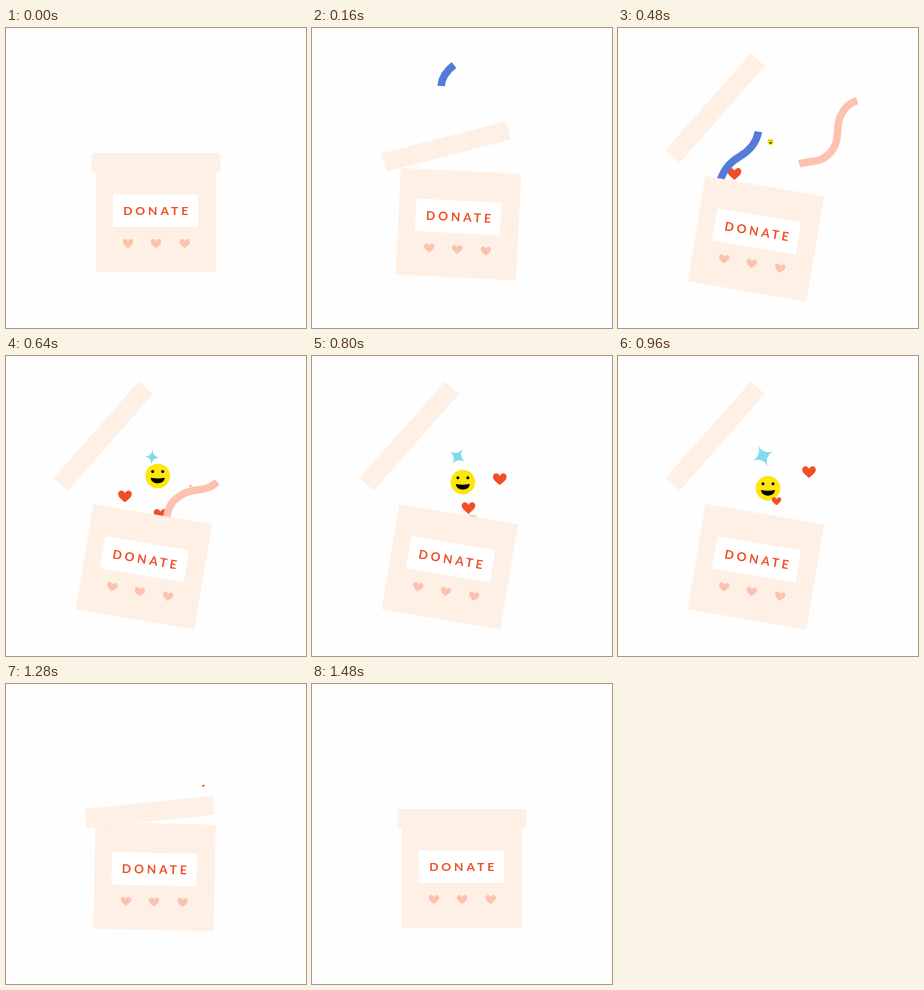
These frames come from a looping animation (300x300 px, 1560 ms). An HTML page:

```html
<!DOCTYPE html>
<html lang="en">
<head>
<meta charset="utf-8">
<title>Donation box</title>
<style>
html, body { margin: 0; width: 100%; height: 100%; overflow: hidden; background: #fefefe; }
svg { display: block; width: 100%; height: 100%; }
.ribbon { fill: none; stroke-width: 7.5; }
.cream { fill: #fef0e4; }
.red { fill: #f04e27; }
.label { font: 700 12.2px Lato, sans-serif; letter-spacing: 2.9px; }
</style>
</head>
<body>
<svg viewBox="0 0 300 300">
  <defs>
    <path id="heart" d="M0 .88C-.4 .5-1 .15-1-.35C-1-.95-.25-1.05 0-.45C.25-1.05 1-.95 1-.35C1 .15 .4 .5 0 .88Z"/>
  </defs>
  <path id="star" fill="#80d9ef" d="M0-1Q.08-.1 1 0Q.1.08 0 1Q-.08.1-1 0Q-.1-.08 0-1Z"/>
  <g id="smiley">
    <circle r="12.3" fill="#fde60c"/>
    <circle cx="-5" cy="-4.5" r="1.5"/>
    <circle cx="5" cy="-4.5" r="1.5"/>
    <path d="M-7 1.8Q0 3.2 7 1.8C6.5 9.2-6.5 9.2-7 1.8Z"/>
  </g>
  <g id="hearts" class="red"></g>
  <path id="blue" class="ribbon" stroke="#557bd9" d="M142 37C133 44 129 51 129 60C129 75 141 82 141 97C141 112 133 122 121 129C112 134 104 142 100 160"/>
  <path id="pink" class="ribbon" stroke="#fdc1b0" d="M247.5 71C238 72 231 75 226 82C214 98 226 112 210 127C198 137 190 131 177 138C166 144 161 151 160 168"/>
  <g id="body">
    <rect class="cream" x="-60.2" y="-53.6" width="120.4" height="106.7"/>
    <rect x="-43" y="-24" width="85" height="32.5" fill="#fff"/>
    <text class="label red" x="-32.8" y="-3.3">DONATE</text>
    <g id="row" fill="#fdc1b0"></g>
  </g>
  <rect id="lid" class="cream" x="-64.4" y="-9.5" width="128.8" height="19"/>
</svg>
<script>
const LOOP = 1560, STEP = 40;
const $ = id => document.getElementById(id);
const clamp = x => Math.min(1, Math.max(0, x));
const ramp = (t, a, b) => clamp((t - a) / (b - a));
const mix = (a, b, p) => a + (b - a) * p;
const easeInOut = x => x < .5 ? 2 * x * x : 1 - 2 * (1 - x) ** 2;

// Quick start, long settle: cubic-bezier(.4, 0, .2, 1)
function settle(x) {
  let lo = 0, hi = 1;
  for (let i = 0; i < 24; i++) {
    const s = (lo + hi) / 2, r = 1 - s;
    if (1.2 * r * r * s + .6 * r * s * s + s ** 3 < x) lo = s; else hi = s;
  }
  return lo * lo * (3 - 2 * lo);
}

function place(el, x, y, turn = 0, size = 1) {
  el.setAttribute('visibility', size > 0 ? 'visible' : 'hidden');
  el.setAttribute('transform', `translate(${x} ${y}) rotate(${turn}) scale(${size})`);
}

function addHeart(parent) {
  const el = document.createElementNS('http://www.w3.org/2000/svg', 'use');
  el.setAttribute('href', '#heart');
  return $(parent).appendChild(el);
}

// Grow in after `from`, shrink away before `to`
const pop = (t, from, to, span = 160) =>
  Math.min(ramp(t, from, from + span), 1 - ramp(t, to - span, to));

const drifts = [
  { from: 230, to: 800, t0: 320, x: 114, y: 151.5, vx: .0155, vy: -.035 },
  { from: 480, to: 1070, t0: 640, x: 154.5, y: 158.7, vx: .0125, vy: -.042 },
  { from: 620, to: 1310, t0: 960, x: 191, y: 116, vx: .02, vy: -.044 }
].map(d => ({ ...d, el: addHeart('hearts') }));

[-28, 0, 28.7].forEach(x => place(addHeart('row'), x, 25, 0, 5.2));

function ribbon(el, t, start) {
  const total = el.getTotalLength();
  const head = Math.min(total, Math.max(0, (t - start) * .5));
  const tail = Math.min(total, Math.max(0, (t - start - 188) * .4));
  el.setAttribute('visibility', head > tail ? 'visible' : 'hidden');
  el.setAttribute('stroke-dasharray', `${Math.max(0, head - tail)} 999`);
  el.setAttribute('stroke-dashoffset', -tail);
}

function draw(t) {
  const open = t < 700 ? easeInOut(ramp(t, 10, 400)) : 1 - settle(ramp(t, 976, 1480));
  place($('body'), mix(150, 137.8, open), mix(190.5, 211, open), 9.6 * open);
  place($('lid'), mix(150, 97.3, open), mix(134.5, 80, open), -48.5 * open);

  ribbon($('blue'), t, 109);
  ribbon($('pink'), t, 271);

  for (const d of drifts) {
    const dt = t - d.t0;
    place(d.el, d.x + d.vx * dt, d.y + d.vy * dt, 0, 6.8 * pop(t, d.from, d.to));
  }

  const p = (t - 640) / 320;
  place($('smiley'), mix(151.7, 150, p), mix(120, 132.3, p), 0, pop(t, 440, 1140));
  const arm = mix(7.2, 11.2, clamp(p)) * pop(t, 480, 1130);
  place($('star'), mix(146, 145, p), mix(101, 100, p), mix(5, 65, p), arm);
}

function tick() {
  const t = performance.now() % LOOP;
  draw(Math.min(1480, Math.floor(t / STEP) * STEP));
  requestAnimationFrame(tick);
}
tick();
</script>
</body>
</html>
```
